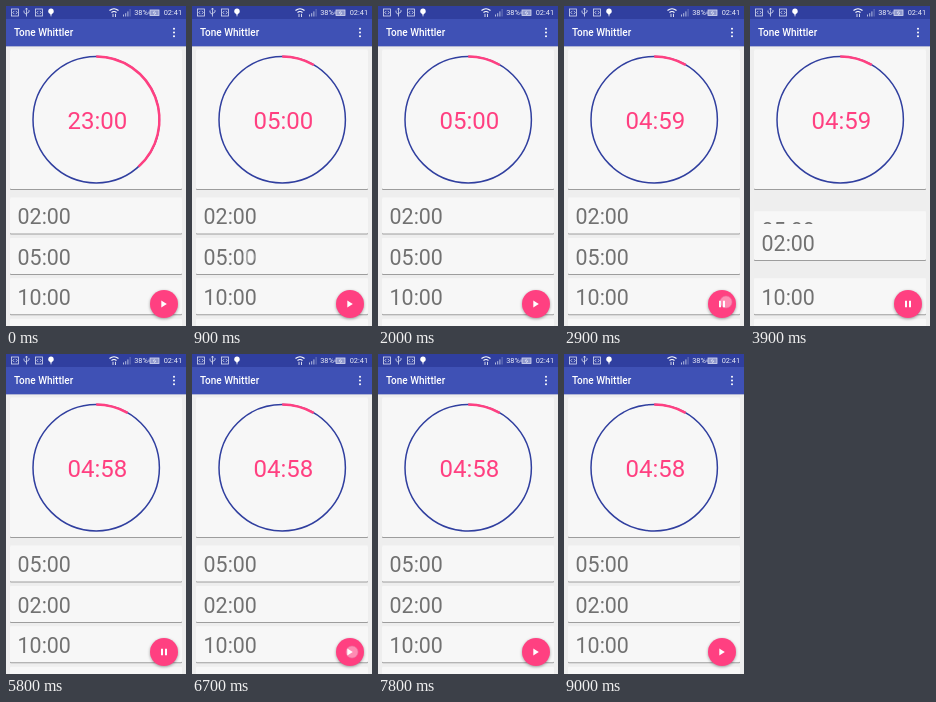
These frames come from a looping animation (180 by 320 pixels, 9.1 s). An HTML page:

```html
<!DOCTYPE html>
<html lang="en">
<head>
<meta charset="utf-8">
<title>Countdown timer</title>
<style>
html, body { margin: 0; width: 100%; height: 100%; overflow: hidden; background: #eee; }
svg { display: block; width: 100vw; height: 100vh; }
text { font-family: Roboto, "Noto Sans", sans-serif; }
.card { fill: #f7f7f7; filter: drop-shadow(0 1px .6px rgba(0, 0, 0, .34)); }
.row { font-size: 21.4px; fill: #717171; }
.small { font-size: 7.4px; fill: #e9ebf7; }
.line { fill: none; stroke: #d9ddf2; stroke-width: .8; }
</style>
</head>
<body>
<svg viewBox="0 0 180 320">
  <rect width="180" height="320" fill="#eee"/>

  <rect class="card" x="4" y="43.5" width="172" height="139.5" rx="1"/>
  <circle cx="90.2" cy="113.7" r="63.2" fill="none" stroke="#303f9f" stroke-width="1.5"/>
  <path id="arc" fill="none" stroke="#ff4081" stroke-width="2.5"/>
  <text id="clock" x="91.4" y="122.7" text-anchor="middle" font-size="24" fill="#ff4081"></text>

  <g id="rows"></g>

  <rect width="180" height="40.3" fill="#3f51b5" style="filter:drop-shadow(0 .6px .6px rgba(0,0,0,.2))"/>
  <rect width="180" height="13" fill="#303f9f"/>
  <text x="8" y="30.3" font-size="10" font-weight="500" fill="#fff">Tone Whittler</text>
  <g fill="#fff">
    <circle cx="168" cy="22.8" r="1"/><circle cx="168" cy="26.5" r="1"/><circle cx="168" cy="30.2" r="1"/>
  </g>

  <g class="line">
    <rect x="5.5" y="3" width="7" height="7"/>
    <path d="M8.3 4.9 6.800 6.500l1.500 1.600M9.800 4.900 11.300 6.500 9.800 8.100"/>
    <path d="M20.5 2v8.500M18 4.500v2l2.500 2M23 4v2l-2.500 1.500M19.400 3.500l1.100-1.500L21.600 3.500"/>
    <rect x="29.5" y="3" width="7" height="7"/>
    <path d="M32.300 4.900 30.800 6.500l1.500 1.600M33.800 4.900 35.300 6.500l-1.500 1.600"/>
    <path d="M103.500 4.500q4.500-3.500 9 0M105.500 6.500q2.500-2 5 0" stroke="#fff" stroke-width="1.200"/>
    <path d="M107 11V7.800M109.500 7.800V11" stroke="#fff"/>
    <path d="M117.500 10.500v-2M119.700 10.500V7.200M121.900 10.500V5.400"/>
    <path d="M124.100 10.500V3" opacity=".45"/>
    <rect x="144" y="4" width="9" height="5.500" fill="#8f98cd"/>
    <path d="M143 5.500v2.500M148.900 4.700 147 7h3l-1.800 2"/>
  </g>
  <g fill="#fff"><circle cx="45" cy="5.200" r="2.700"/><path d="M44 7h2l-1 4z"/></g>
  <text class="small" x="128.2" y="9.300">38%</text>
  <text class="small" x="157.700" y="9.300">02:41</text>

  <circle cx="158" cy="298" r="14" fill="#ff4081" style="filter:drop-shadow(0 1.5px 1.5px rgba(0,0,0,.35))"/>
  <path id="icon" fill="#fff"/>
  <circle id="touch" r="6" fill="#fff" stroke="#bcc5d0" stroke-width=".6"/>
</svg>
<script>
const LOOP = 9100;
const PICK = 800, START = 2700, MOVE = 3540, TICK = 5600, PAUSE = 6600;
const MOVE_TIME = 600, ROW_TOP = 191.5, ROW_STEP = 40.4;
const DIAL = { x: 90.2, y: 113.7, r: 63.2 };
const PLAY_ICON = 'M155.3 294.5v7l5.5-3.5z';
const PAUSE_ICON = 'M155 294.7h2v6.6h-2zM159 294.7h2v6.6h-2z';
const TAPS = [[PICK, 57, 251], [START + 100, 162, 296], [PAUSE, 160, 298]];

const get = id => document.getElementById(id);
const clamp = v => Math.max(0, Math.min(1, v));
const ease = v => (1 - Math.cos(Math.PI * clamp(v))) / 2;
const pad = n => String(n).padStart(2, '0');

function addRow(label) {
  const row = document.createElementNS('http://www.w3.org/2000/svg', 'g');
  row.innerHTML = `<rect class="card" x="4" width="172" height="36" rx="1"/>
    <text class="row" x="11.6" y="26.7">${label}</text>`;
  get('rows').append(row);
  return row;
}

function place(row, slot) {
  row.setAttribute('transform', `translate(0 ${ROW_TOP + slot * ROW_STEP})`);
}

// The 02:00 card comes later so that it passes over the 05:00 card.
const [five, two, ten, next] = ['05:00', '02:00', '10:00', '15:00'].map(addRow);
place(ten, 2);
place(next, 3);

function secondsAt(t) {
  if (t < PICK) return 23 * 60;
  if (t < START) return 300;
  return t < TICK ? 299 : 298;
}

function drawClock(seconds) {
  const { x, y, r } = DIAL;
  const angle = seconds / 3600 * 2 * Math.PI;
  const endX = x + r * Math.sin(angle), endY = y - r * Math.cos(angle);
  get('arc').setAttribute('d', `M${x} ${y - r}A${r} ${r} 0 0 1 ${endX} ${endY}`);
  get('clock').textContent = `${pad(Math.floor(seconds / 60))}:${pad(seconds % 60)}`;
}

function drawTouch(t) {
  const tap = TAPS.find(([time]) => Math.abs(t - time) < 220);
  const touch = get('touch');
  touch.setAttribute('opacity', tap ? .4 * clamp((220 - Math.abs(t - tap[0])) / 120) : 0);
  if (!tap) return;
  touch.setAttribute('cx', tap[1]);
  touch.setAttribute('cy', tap[2]);
}

function render(t) {
  drawClock(secondsAt(t));
  const swap = ease((t - MOVE) / MOVE_TIME);
  place(two, swap);
  place(five, 1 - swap);
  get('icon').setAttribute('d', t >= START && t < PAUSE ? PAUSE_ICON : PLAY_ICON);
  drawTouch(t);
}

const begin = performance.now();
function frame() {
  render((performance.now() - begin) % LOOP);
  requestAnimationFrame(frame);
}
frame();
</script>
</body>
</html>
```
